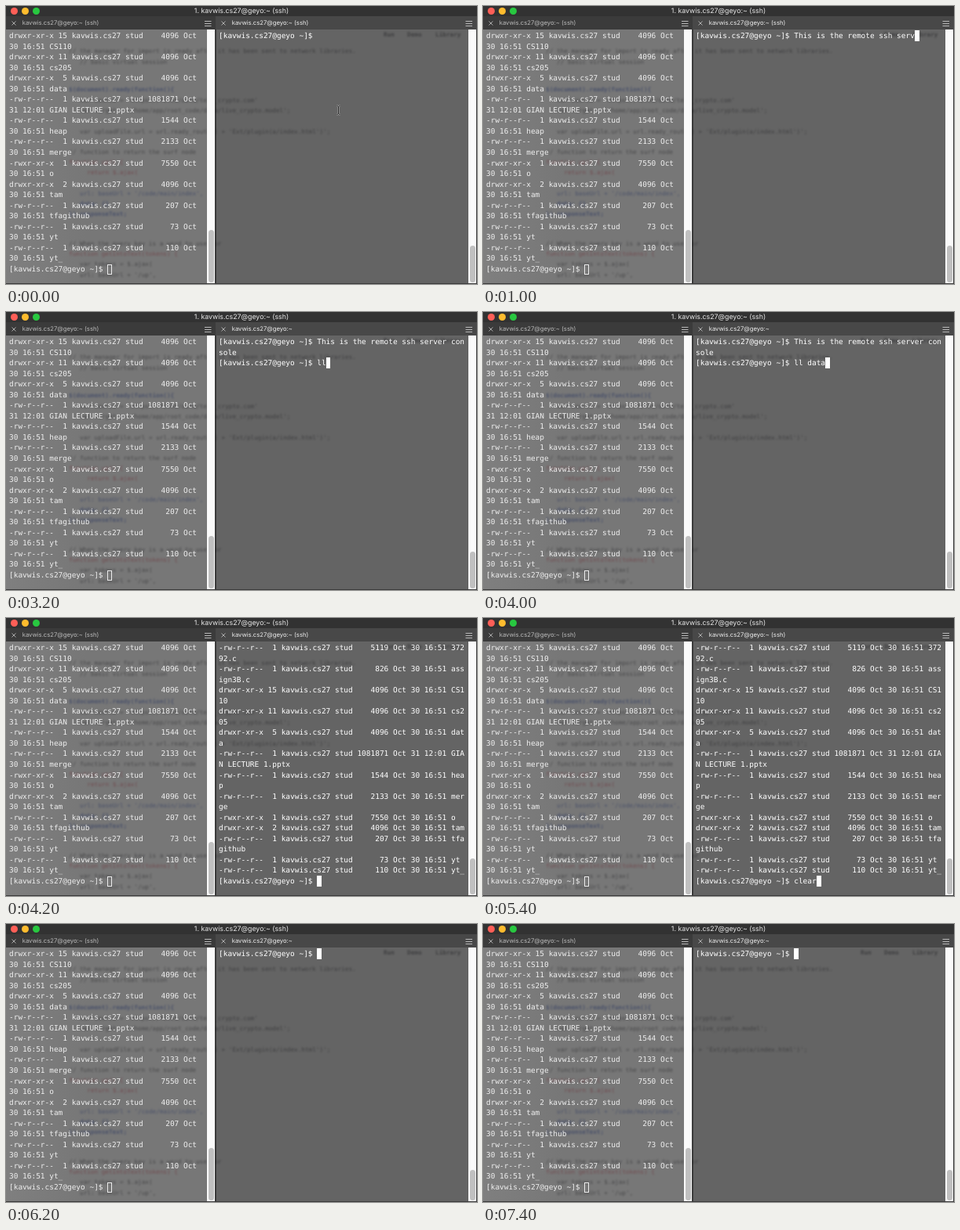
An HTML page for the animation above (8 s loop, 600 by 355 pixels).

```html
<!DOCTYPE html>
<html lang="en">
<head>
<meta charset="utf-8">
<title>Terminal</title>
<style>
html, body { margin: 0; width: 100%; height: 100%; overflow: hidden; background: #333; }
#stage { position: absolute; left: 0; top: 0; width: 600px; height: 355px; overflow: hidden; background: #3a3a3a; text-rendering: geometricPrecision; }
#stage div, #stage pre, #stage svg { position: absolute; margin: 0; }
.bar { left: 0; width: 600px; font-family: Inter, "Open Sans", sans-serif; white-space: pre; }
#title { top: 0; height: 14px; background: #323232; color: #e8e8e8; font-size: 8.8px; line-height: 13px; text-align: center; }
#title i { position: absolute; top: 1.6px; width: 9px; height: 9px; border-radius: 50%; }
#tabs { top: 13px; height: 17px; background: #3b3b3b; font-size: 7.7px; line-height: 17px; color: #bcbcbc; }
#tabs .active { left: 267px; top: 0; width: 333px; height: 17px; background: #484848; color: #eee; }
#tabs span { position: absolute; left: 20.7px; top: 0; }
#tabs svg { left: 0; top: 0; }
.pane { top: 30px; height: 324px; }
#left { left: 0; width: 256px; background: linear-gradient(90deg, #7f7f7f, #777 40%); }
#right { left: 268px; width: 321px; background: #646464; }
#ghost { left: 0; top: 0; }
#ghost text { font: 7.7px "DejaVu Sans Mono", monospace; fill: #1b1b1e; white-space: pre; }
#ghost .bold { font-weight: bold; }
#ghost .red { fill: #6a2028; }
#ghost .blue { fill: #1d2c5c; }
.term { top: 32px; font: 9.468px/13.55px "DejaVu Sans Mono", monospace; white-space: pre; }
#log { left: 4px; color: #efefef; }
#shell { left: 271px; color: #fff; }
#block { width: 5.7px; height: 13.5px; background: #fff; }
#hollow { left: 128.5px; top: 330px; width: 4px; height: 11px; border: 1px solid #ececec; }
.track { top: 30px; height: 324px; background: #fafafa; }
.thumb { width: 6.5px; bottom: 1px; border-radius: 4px; background: #c0c0c0; }
</style>
</head>
<body>
<div id="stage">
  <div class="pane" id="left"></div>
  <div class="pane" id="right"></div>
  <svg id="ghost" width="589" height="354" opacity=".5" style="filter:blur(1px)"></svg>
  <div class="track" style="left:256px;width:10px"><div class="thumb" style="left:2px;top:256px"></div></div>
  <div class="track" style="left:589px;width:10px"><div class="thumb" id="thumb" style="left:2px"></div></div>
  <pre class="term" id="log"></pre>
  <div id="hollow"></div>
  <pre class="term" id="shell"></pre>
  <div id="block"></div>
  <svg id="mouse" width="7" height="14" viewBox="0 0 7 14" fill="none">
    <path d="M1.5 1.5Q3.5 1.5 3.5 3Q3.5 1.5 5.5 1.5M3.5 3V11M1.5 12.5Q3.5 12.5 3.5 11Q3.5 12.5 5.5 12.5" stroke="#bbb" stroke-width="1.9"/>
    <path d="M1.5 1.5Q3.5 1.5 3.5 3Q3.5 1.5 5.5 1.5M3.5 3V11M1.5 12.5Q3.5 12.5 3.5 11Q3.5 12.5 5.5 12.5" stroke="#222" stroke-width=".9"/>
  </svg>
  <div class="bar" id="title"><i style="left:5.5px;background:#ff5f57"></i><i style="left:19.5px;background:#febc2e"></i><i style="left:33.5px;background:#28c840"></i><span id="name"></span></div>
  <div class="bar" id="tabs">
    <span id="tabL"></span>
    <div class="active"><span id="tabR"></span></div>
    <svg width="600" height="17" stroke="#b8b8b8" fill="none">
      <path d="M7.5 6.5l5 5m0-5l-5 5M274.5 6.5l5 5m0-5l-5 5" stroke-width=".9"/>
      <path d="M253 6.5h8.5M253 9.5h8.5M253 12.5h8.5M585.5 6.5h8.5M585.5 9.5h8.5M585.5 12.5h8.5"/>
    </svg>
  </div>
</div>
<script>
const $ = id => document.getElementById(id);
const LOOP = 8000, COLS = 55, CW = 5.7, ROW = 13.55;
const user = 'kavwis.cs27', host = user + '@geyo';
const prompt = `[${host} ~]$ `;
const FILE = '-rw-r--r--', DIR = 'drwxr-xr-x', EXE = '-rwxr-xr-x';
const D30 = '30 16:51';
const files = [
  [FILE, 1, 5119, D30, '37292.c'], [FILE, 1, 826, D30, 'assign3B.c'],
  [DIR, 15, 4096, D30, 'CS110'], [DIR, 11, 4096, D30, 'cs205'],
  [DIR, 5, 4096, D30, 'data'], [FILE, 1, 1081871, '31 12:01', 'GIAN LECTURE 1.pptx'],
  [FILE, 1, 1544, D30, 'heap'], [FILE, 1, 2133, D30, 'merge'],
  [EXE, 1, 7550, D30, 'o'], [DIR, 2, 4096, D30, 'tam'],
  [FILE, 1, 207, D30, 'tfagithub'], [FILE, 1, 73, D30, 'yt'], [FILE, 1, 110, D30, 'yt_']
];
const entry = ([mode, links, size, date, name], gap) =>
  `${mode} ${String(links).padStart(2)} ${user} stud${String(size).padStart(8)} Oct${gap}${date} ${name}`;
const wrap = line => line.match(new RegExp(`.{1,${COLS}}`, 'g')) || [''];

$('log').textContent = [...files.slice(2).map(f => entry(f, '\n')), prompt].join('\n');
$('name').textContent = `1. ${host}:~ (ssh)`;
$('tabL').textContent = `${host}:~ (ssh)`;

// Blurred editor behind the translucent window
const ghosts = [
  [80, 60, '// the manager for import is ready after it has been sent to network libraries.'],
  [94, 74, '// basic virtual session'],
  [80, 109, '$(document).ready(function(){', 'bold blue'],
  [94, 123, "var source = 'https://files/data/text_crypto.com'"],
  [94, 136, "var target = '/home/app/root_code/data/live_crypto.model';"],
  [94, 163, "var uploadFile.url = url.ready_route() + 'Ext/plugin(a/index.html')';"],
  [80, 189, '// function to return the surf node'],
  [80, 202, 'function up() {', 'red'], [94, 215, '  return $.ajax(', 'red'],
  [94, 242, "url: baseUrl + '/code/main/index',", 'blue'],
  [94, 255, 'data: {}', 'bold blue'], [80, 268, '}).responseText;', 'bold blue'],
  [80, 306, '// When the query key is a word to use for'],
  [80, 319, 'function getIntoText(tokens) {', 'red'],
  [94, 332, 'var tokens = $.ajax('], [94, 346, "url: baseUrl + '/up',"],
  [481, 39, 'Run', 'bold'], [511, 39, 'Demo', 'bold'], [547, 39, 'Library', 'bold']
];
$('ghost').innerHTML = ghosts.map(([x, y, s, look = '']) =>
  `<text x="${x}" y="${y}" class="${look}">${s}</text>`).join('');

const greet = 'This is the remote ssh server console';
const listing = files.flatMap(f => wrap(entry(f, ' ')));
// Last value whose time has been reached
const at = (t, steps) => steps.reduce((v, [start, val]) => t >= start ? val : v, steps[0][1]);

const greetLen = [[0, 0], [200, 3], [400, 9], [600, 15], [800, 21], [1000, 27], [1200, 33], [1800, 35], [2000, 36], [2200, 37]];
const listLen = [[0, 0], [3000, 1], [3200, 2], [3400, 3], [3600, 4], [3800, 6], [4000, 7]];
const clearLen = [[0, 0], [4600, 1], [4800, 2], [5000, 3], [5200, 4], [5400, 5]];
const cursorOn = [[0, 0], [200, 1], [5800, 0], [6000, 1], [7000, 0], [7400, 1]];
const sshTab = [[0, 1], [2600, 0], [4200, 1], [5600, 0]];
const thumbTop = [[0, 276], [4200, 277], [5600, 284]];

function screen(t) {
  if (t >= 5600) return [prompt];
  if (t >= 4200) return [...listing, prompt + 'clear'.slice(0, at(t, clearLen))];
  const first = wrap(prompt + greet.slice(0, at(t, greetLen)));
  if (t < 2600) return first;
  return [...first, prompt + 'll data'.slice(0, at(t, listLen))];
}

function draw(t) {
  const lines = screen(t);
  let row = lines.length - 1, col = lines[row].length;
  if (col === COLS) { row++; col = 0; }
  $('shell').textContent = lines.join('\n');
  const block = $('block').style;
  block.left = 271 + col * CW + 'px';
  block.top = 31.3 + row * ROW + 'px';
  block.visibility = at(t, cursorOn) ? 'visible' : 'hidden';
  $('tabR').textContent = `${host}:~` + (at(t, sshTab) ? ' (ssh)' : '');
  $('thumb').style.top = at(t, thumbTop) + 'px';
  const early = t < 200, mouse = $('mouse').style;
  mouse.visibility = early || t >= 2400 && t < 2600 ? 'visible' : 'hidden';
  mouse.left = (early ? 419.5 : 423.5) + 'px';
  mouse.top = (early ? 126 : 100) + 'px';
}

const begin = performance.now();
function tick() {
  draw((performance.now() - begin) % LOOP);
  requestAnimationFrame(tick);
}
tick();
</script>
</body>
</html>
```
